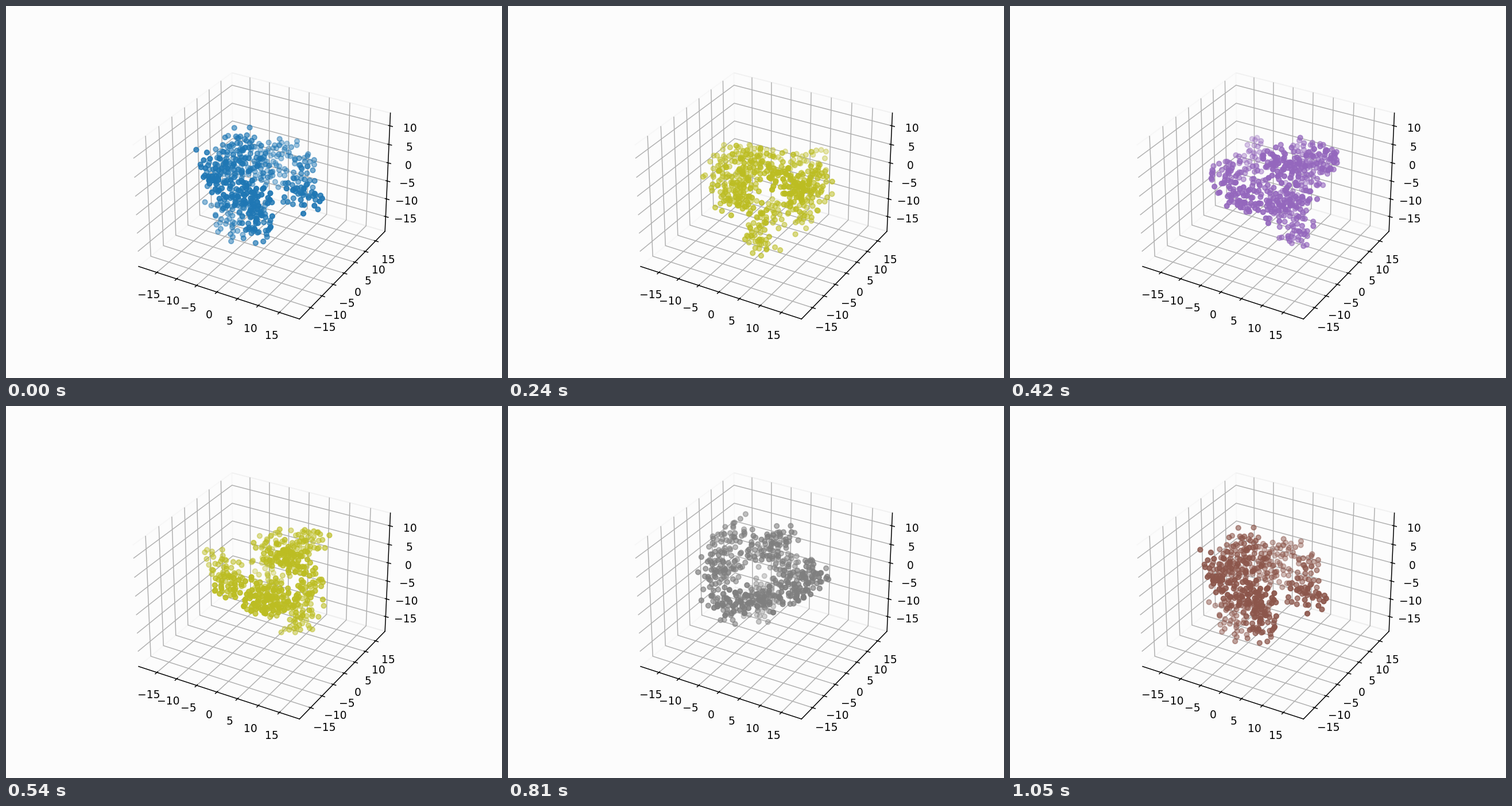
Write a matplotlib script that moves like this. It is 864 px wide and 648 px high and loops after 1080 ms.

```python
import numpy as np
import matplotlib.pyplot as plt
from matplotlib.animation import ArtistAnimation

FRAMES, INTERVAL = 36, 30
BACK = "#fcfcfc"
RADIUS, Z_LOW, Z_HIGH = 17.2, -17.3, 11.4

# Key points of a folded chain: right, away from the viewer, up
CHAIN = np.array([
    (12, -11, 2), (7, -5, -1), (8.5, 5, 1), (4, 10, 3), (-1, 10.5, 0),
    (3, 6.5, -3), (-1, 4, 0), (-7, 8, -2), (-10.5, 2, 0), (-5.5, 5, 8.5),
    (-2, -1, 6), (-12, -6, 7), (-8, -9, 3), (-6, -5, -1), (-2, -11.5, 4),
    (-1, -11, -4), (-2.5, -7.5, -9), (-2, 0, -6), (-10, 1, -9),
    (-6, -1, -14.5),
])


def make_cloud(count=500, spread=1.6, gap=1.2):
    """Scatter points along the chain, none closer than gap."""
    rng = np.random.default_rng(7)
    steps = np.linalg.norm(np.diff(CHAIN, axis=0), axis=1)
    length = np.concatenate([[0], np.cumsum(steps)])
    cloud = np.empty((0, 3))
    for s in np.linspace(0, length[-1], count):
        centre = [np.interp(s, length, column) for column in CHAIN.T]
        for _ in range(50):
            p = centre + rng.normal(0, spread, 3).clip(-3, 3)
            inside = np.hypot(p[0], p[1]) < RADIUS and Z_LOW < p[2] < Z_HIGH
            if inside and (np.linalg.norm(cloud - p, axis=1) > gap).all():
                cloud = np.vstack([cloud, p])
                break
    return cloud


def turn(points, angle):
    x, y, z = points.T
    c, s = np.cos(angle), np.sin(angle)
    return x * c - y * s, x * s + y * c, z


fig = plt.figure(figsize=(6.4, 4.8), dpi=135, facecolor=BACK)
ax = fig.add_subplot(projection="3d", facecolor=BACK)
for axis in (ax.xaxis, ax.yaxis, ax.zaxis):
    axis.pane.fill = False

cloud = make_cloud()
angles = np.radians(30) + np.linspace(0, 2 * np.pi, FRAMES)
scenes = [[ax.scatter(*turn(cloud, a), color=f"C{i % 10}")]
          for i, a in enumerate(angles)]

ax.set_xlim(-19.7, 19.7)
ax.set_ylim(-19.7, 19.7)
ax.set_zlim(-19.2, 13.4)

anim = ArtistAnimation(fig, scenes, interval=INTERVAL, repeat=True,
                       repeat_delay=0, blit=False)
plt.show()
```
